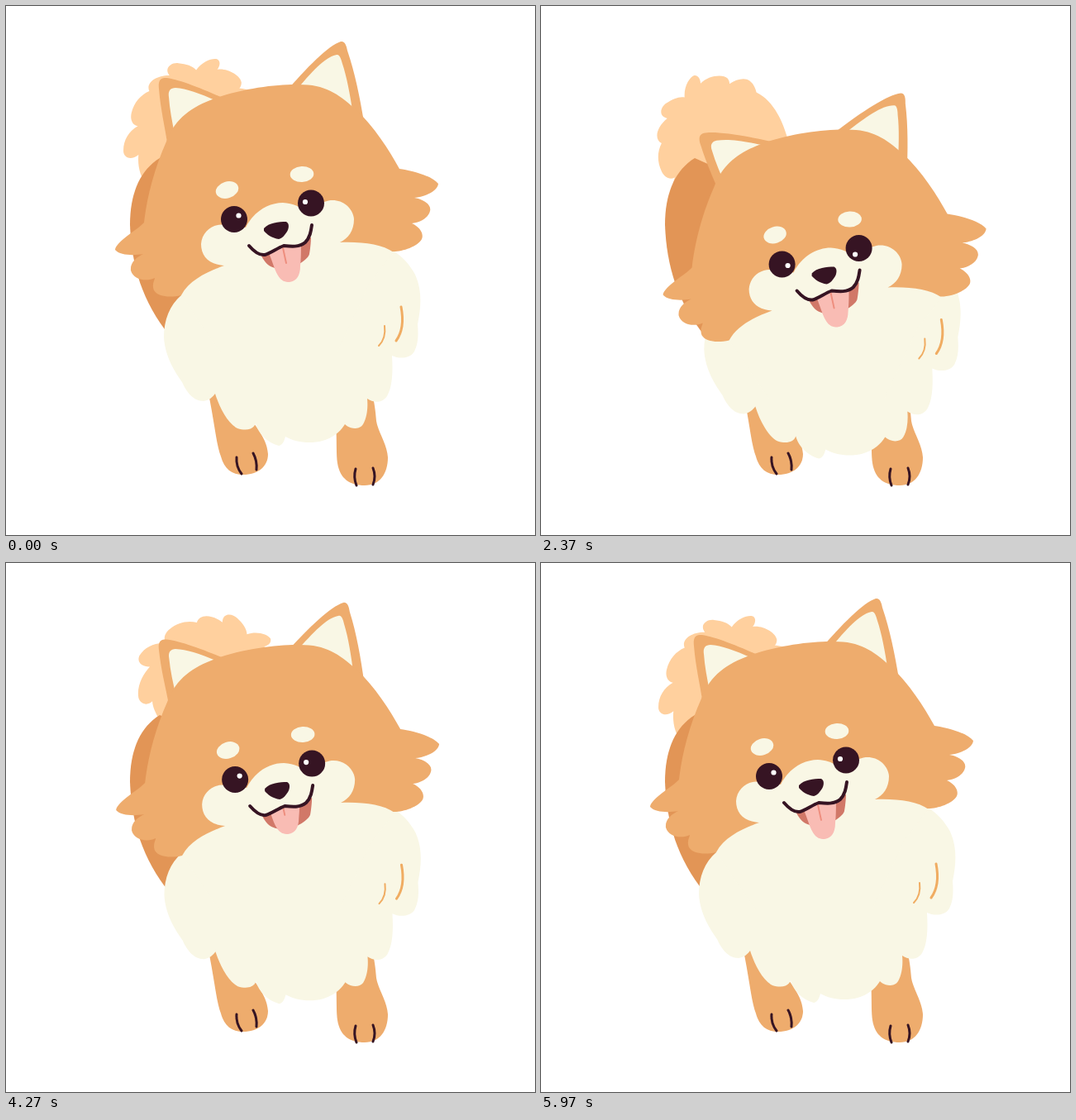
Write an HTML page that moves like this. It is 640 px wide and 640 px high and loops after 6010 ms.

```html
<!DOCTYPE html>
<html lang="en">
<head>
<meta charset="utf-8">
<title>Happy dog</title>
<style>
html, body { margin: 0; width: 100%; height: 100%; overflow: hidden; background: #fff; }
svg { display: block; width: 100vw; height: 100vh; }
.fur { fill: #eeac6d; }
.cream { fill: #f9f7e5; }
.dark { fill: #361423; }
.line { fill: none; stroke: #361423; stroke-width: 3; stroke-linecap: round; stroke-linejoin: round; }
.crease { stroke: #f0ac62; }
</style>
</head>
<body>
<svg viewBox="0 0 640 640">
  <clipPath id="belowLips">
    <path d="M294 290C300 297 306 302 313 301C320 299 328 293 336 290C345 291 355 292 362 286C368 280 369 272 370 265L400 400H280Z"/>
  </clipPath>

  <path id="tail" fill="#ffd09e" d="M289 205C260 235 215 230 198 214C190 208 184 203 181 197C178 205 169 206 164 200C156 188 157 172 161 160
    C153 164 144 162 144 153C146 140 155 130 168 126C161 123 161 115 164 109C170 97 180 90 191 88C189 78 202 71 219 75
    C214 64 226 60 233 63C242 66 249 70 252 76C262 67 275 66 280 69C284 73 280 79 277 81C290 82 303 95 302 103
    C301 106 300 108 298 109C308 112 316 119 316 126C316 132 313 137 310 141C315 165 300 190 289 205Z"/>
  <path fill="#e29556" d="M186 184C160 200 150 230 150 265C152 315 165 358 198 399L260 410L300 250C270 225 230 203 186 184Z"/>

  <g class="fur">
    <path d="M244 465C252 500 254 530 260 545C264 560 273 567 287 567C305 567 317 557 317 542C316 530 311 520 300 505L290 460Z"/>
    <path d="M398 490C401 520 399 540 401 553C404 572 416 580 434 580C452 580 462 566 462 546C461 530 450 515 448 502C447 490 446 480 442 465Z"/>
  </g>
  <path class="line" d="M279 546Q278 557 285 566M299 541Q304 550 303 561M423 560Q420 570 424 580M444 559Q448 569 444 579"/>

  <g id="body">
    <path class="cream" d="M212 350C198 362 191 380 191 400C192 425 206 445 213 455C218 466 226 478 239 478C246 477 250 473 253 469
      C258 485 268 505 280 511C290 514 299 513 302 505C304 514 314 528 330 532C335 531 337 525 338 521C350 528 368 530 383 526
      C397 522 405 514 410 506C416 512 428 513 432 506C437 498 438 485 437 475C444 480 455 481 461 472C468 460 468 440 467 423
      C475 427 489 427 494 418C499 408 499 398 498 385C502 365 504 345 495 325C488 312 480 304 470 297L400 280L260 315Z"/>
    <path class="line crease" d="M478 364Q483 390 472 405"/>
    <path class="line crease" stroke-width="2" style="stroke-width:2" d="M458 387Q460 402 451 411"/>
  </g>

  <g id="head">
    <g id="earL">
      <path class="fur" d="M285 122C240 100 205 87 192 87C186 87 184 92 185 100C187 125 192 145 195 165L205 195L270 135Z"/>
      <path class="cream" d="M262 118C235 106 220 100 205 99C198 99 196 104 197 110C198 125 201 140 204 155L230 150Z"/>
    </g>
    <g id="earR">
      <path class="fur" d="M335 108C365 73 390 48 405 43C410 42 412 48 413 54C422 80 428 110 433 140L440 175L340 150Z"/>
      <path class="cream" d="M350 103C370 80 385 62 400 59C404 58 406 66 407 70C412 85 416 105 420 132L380 140Z"/>
    </g>
    <path class="fur" d="M212 350C198 353 184 352 179 344C176 336 180 332 180 329C172 333 155 333 151 320C150 310 158 304 166 300
      C155 302 138 302 132 295C133 285 160 270 167 262C170 235 178 200 194 164C205 135 225 122 252 112C285 100 325 95 350 95
      C385 94 400 105 422 124C445 145 464 175 476 197C490 199 515 205 523 215C522 225 505 231 494 232C505 234 515 240 513 248
      C511 257 500 262 491 263C500 267 506 275 503 282C498 291 480 297 469 297L430 300L250 335Z"/>
    <g class="cream">
      <path d="M212 350C222 331 245 321 264 314C245 313 236 302 236 288C237 272 252 262 266 265L290 268C300 248 318 238 335 238
        C348 239 356 243 362 248L385 237C402 230 420 242 421 258C421 272 414 281 404 286C430 285 455 288 469 298L440 335L400 420H260Z"/>
      <ellipse rx="14" ry="10" transform="translate(267.5 222.5) rotate(-17)"/>
      <ellipse rx="14.3" ry="9.5" transform="translate(358 203.5) rotate(-3)"/>
    </g>
    <g clip-path="url(#belowLips)">
      <path fill="#d17868" d="M306 295C312 312 320 318 334 318C350 318 366 306 367 300C368 295 369 285 369 280L336 288Z"/>
      <g id="tongue">
        <path fill="#f9bcb4" d="M314 290C322 306 324 318 329 326C333 333 338 334 343 334C352 333 356 325 356 315C357 305 357 298 357 280Z"/>
        <path fill="none" stroke="#ee8e7e" stroke-width="2" stroke-linecap="round" d="M334 288L339 311"/>
      </g>
    </g>
    <path class="line" style="stroke-width:4" d="M294 290C300 297 306 302 313 301C320 299 328 293 336 290C345 291 355 292 362 286C368 280 369 272 370 265"/>
    <path class="dark" d="M312 269C318 262 330 261 339 261C343 263 342 268 341 271C338 277 334 281 330 282C322 281 315 276 312 272Z"/>
    <circle class="dark" cx="276" cy="258" r="16"/>
    <circle class="dark" cx="369" cy="238.5" r="16"/>
    <circle id="glintL" cx="281.5" cy="253.5" r="3.1" fill="#fff"/>
    <circle id="glintR" cx="362" cy="237" r="3.1" fill="#fff"/>
  </g>
</svg>
<script>
const LOOP = 6010, FRAME = 100 / 3, LAST = 179, BEAT = 18;
const set = (id, value) => document.getElementById(id).setAttribute('transform', value);
const shift = (id, x, y) => set(id, `translate(${x} ${y})`);
const turn = (id, angle, x, y) => set(id, `rotate(${angle} ${x} ${y})`);

function ease(u) {
  u = Math.min(1, Math.max(0, u));
  return u * u * (3 - 2 * u);
}

// 0 to 1 starting at frame a, back to 0 starting at frame b
const dip = (f, a, b) => ease((f - a) / BEAT) - ease((f - b) / BEAT);

// eased travel between one key value per beat
function beat(f, key) {
  const i = Math.floor(f / BEAT);
  return key(i) + (key(i + 1) - key(i)) * ease(f / BEAT - i);
}
const wagKey = i => i % 10 === 0 ? 0 : i % 2 ? 1 : -1;
const pantKey = i => i % 2;

function draw(now) {
  const f = Math.min(LAST, Math.floor((now % LOOP + 5) / FRAME));
  const nod = dip(f, 41, 113), ears = dip(f, 40, 114), look = dip(f, 36, 108);
  const pant = beat(f, pantKey);

  turn('tail', 40 * beat(f, wagKey) - 13, 248, 173);
  shift('body', 6.3 * nod, 15.5 * nod);
  shift('head', 15.6 * nod, 54.5 * nod);
  turn('earL', -12.5 * ears, 243, 141);
  turn('earR', 12 * ears, 374, 117);
  shift('tongue', -3 * pant, -10.5 * pant);
  shift('glintL', 1.5 * look, 6 * look);
  shift('glintR', 2.5 * look, 9 * look);
}

const start = performance.now();
function tick() {
  draw(performance.now() - start);
  requestAnimationFrame(tick);
}
tick();
</script>
</body>
</html>
```
